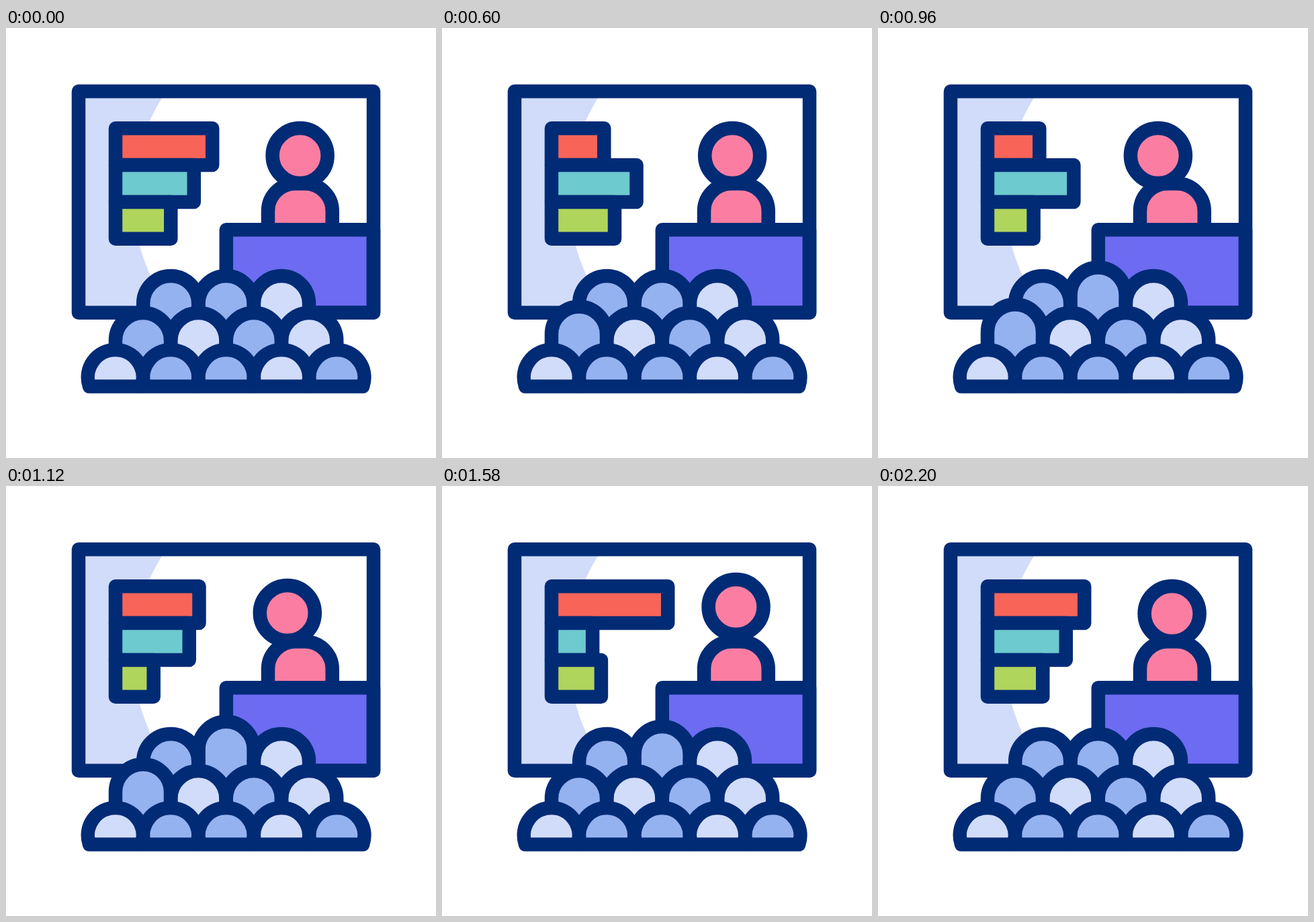
Write an HTML page that moves like this. It is 640x640 px and loops after 2.4 s.

```html
<!DOCTYPE html>
<html lang="en">
<head>
<meta charset="utf-8">
<title>Presentation</title>
<style>
  html, body { margin: 0; width: 100%; height: 100%; overflow: hidden; background: #fff; }
  svg { display: block; width: 100%; height: 100%; }
  .line { stroke: #022b76; stroke-width: 20.5; stroke-linejoin: round; }
</style>
</head>
<body>
<svg id="stage" viewBox="0 0 640 640">
  <rect x="108" y="94.3" width="439" height="329.5" fill="#d1dcfa"/>
  <clipPath id="screen"><rect x="108" y="94.3" width="439" height="329.5"/></clipPath>
  <circle cx="467" cy="252" r="277.6" fill="#fff" clip-path="url(#screen)"/>
  <g id="bars"></g>
  <path class="line" fill="#fb7ea2" d="M390 300V272.5A41 41 0 0 1 431 231.5H444.7A41 41 0 0 1 485.7 272.5V300"/>
  <circle id="speaker" class="line" r="41" fill="#fb7ea2"/>
  <rect class="line" x="327.8" y="300.3" width="219.2" height="123.5" fill="#6c6bf2"/>
  <rect class="line" x="108" y="94.3" width="439" height="329.5" fill="none"/>
  <g id="crowd"></g>
</svg>
<script>
const LOOP = 2400, START = 200, SPAN = 2000, STEP = 20;
const LIGHT = "#d1dcfa", MID = "#94b2f0";
const HEAD_R = 41, HEAD_GAP = 82.4;

// Each track is a list of [progress, value] stops.
const barTracks = [
  { color: "#f96458", stops: [[0, 307.2], [.3, 218.2], [.6, 344.2], [.9, 307.2]] },
  { color: "#6dcacf", stops: [[.1, 279.8], [.3, 299.2], [.7, 224], [1, 279.8]] },
  { color: "#b0d55c", stops: [[0, 245.3], [.2, 257], [.5, 217.8], [.8, 245.3]] }
];
const speakerX = [[.1, 437.6], [.4, 416.6], [.7, 437.6]];
const speakerY = [[.4, 190], [.7, 180], [.9, 190]];
const riseBack = [[.2, 0], [.5, 19.2], [.6, 19.2], [.8, 0]];
const riseMiddle = [[0, 0], [.3, 12.6], [.4, 12.6], [.6, 0]];

const rows = [
  { x: 245.2, y: 410, colors: [MID, MID, LIGHT], mover: 1, rise: riseBack },
  { x: 204, y: 465, colors: [MID, LIGHT, MID, LIGHT], mover: 0, rise: riseMiddle },
  { x: 162.8, y: 520, colors: [LIGHT, MID, MID, LIGHT, MID], front: true }
];

const byId = id => document.getElementById(id);

function add(parent, tag, attrs) {
  const node = document.createElementNS("http://www.w3.org/2000/svg", tag);
  for (const key in attrs) node.setAttribute(key, attrs[key]);
  return parent.appendChild(node);
}

function valueAt(stops, p) {
  if (p <= stops[0][0]) return stops[0][1];
  for (let i = 1; i < stops.length; i++) {
    const [p0, a] = stops[i - 1], [p1, b] = stops[i];
    if (p < p1) {
      const u = (p - p0) / (p1 - p0);
      return a + (b - a) * u * u * (3 - 2 * u);
    }
  }
  return stops[stops.length - 1][1];
}

function headPath(x, y, rise) {
  const l = x - HEAD_R, r = x + HEAD_R;
  return `M${l} ${y + 30}V${y - rise}A${HEAD_R} ${HEAD_R} 0 0 1 ${r} ${y - rise}V${y + 30}`;
}

function frontPath(x, y) {
  const drop = 13.5, half = Math.sqrt(HEAD_R ** 2 - drop ** 2);
  return `M${x - half} ${y + drop}A${HEAD_R} ${HEAD_R} 0 1 1 ${x + half} ${y + drop}Z`;
}

const bars = barTracks.map(({ color, stops }, i) => ({
  stops,
  node: add(byId("bars"), "rect", { class: "line", x: 163, y: 149.3 + i * 54.8, height: 54.8, fill: color })
}));

const movers = [];
for (const row of rows) {
  row.colors.forEach((fill, i) => {
    const x = row.x + i * HEAD_GAP;
    const d = row.front ? frontPath(x, row.y) : headPath(x, row.y, 0);
    const node = add(byId("crowd"), "path", { class: "line", fill, d });
    if (i === row.mover) movers.push({ node, x, y: row.y, rise: row.rise });
  });
}

const speaker = byId("speaker");

function draw(ms) {
  const t = Math.floor((ms % LOOP) / STEP) * STEP;
  const p = Math.min(1, Math.max(0, (t - START) / SPAN));
  for (const { node, stops } of bars) node.setAttribute("width", valueAt(stops, p) - 163);
  speaker.setAttribute("cx", valueAt(speakerX, p));
  speaker.setAttribute("cy", valueAt(speakerY, p));
  for (const m of movers) m.node.setAttribute("d", headPath(m.x, m.y, valueAt(m.rise, p)));
}

let origin;
function tick(now) {
  origin ??= now;
  draw(now - origin);
  requestAnimationFrame(tick);
}
draw(0);
requestAnimationFrame(tick);
</script>
</body>
</html>
```
